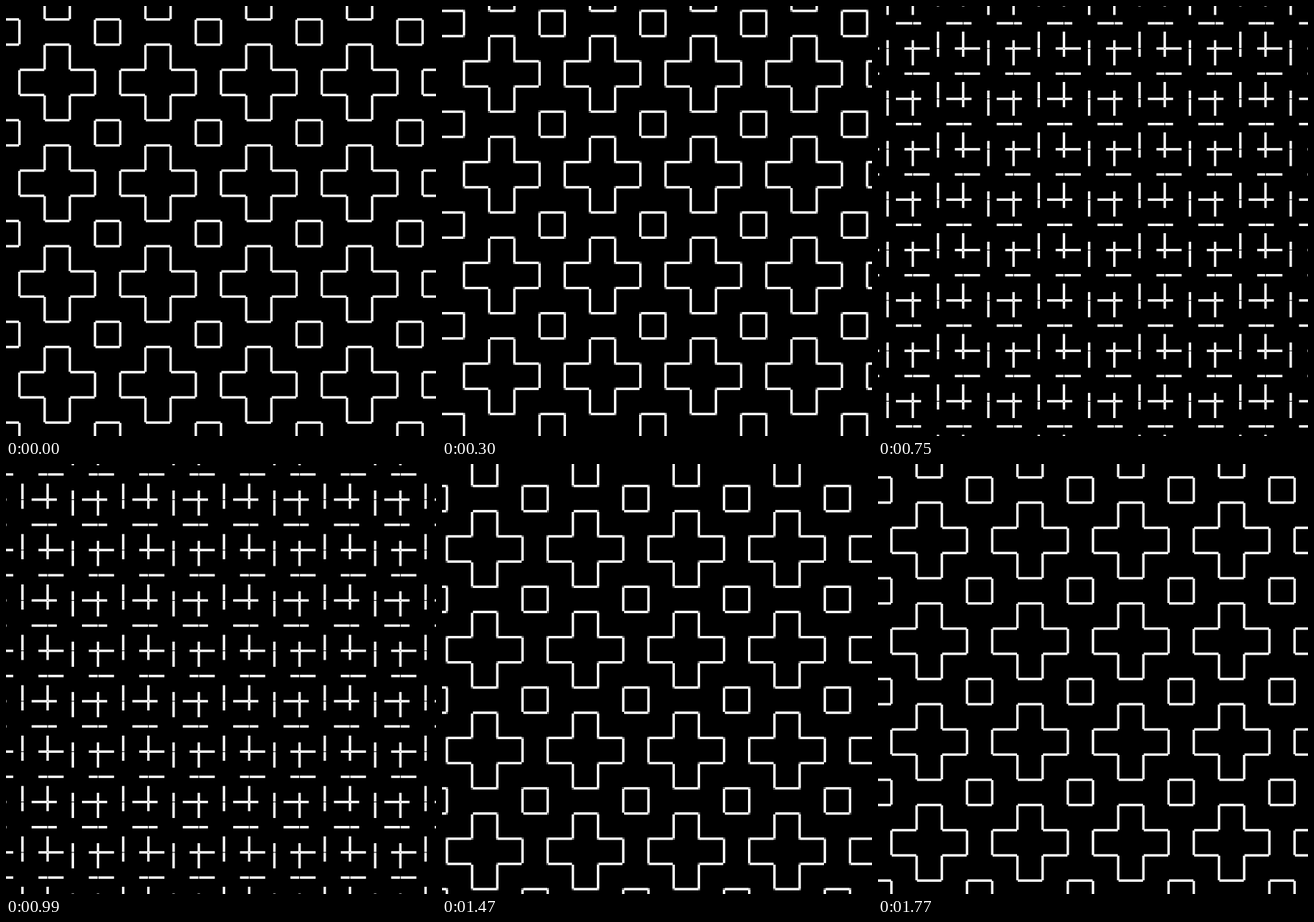
Recreate the animation shown at these times as an HTML page with a canvas. Size 600 by 600 pixels, loop 1.8 s.

```html
<!DOCTYPE html>
<html lang="en">
<head>
<meta charset="utf-8">
<title>Crosses and squares</title>
<style>
  html, body { margin: 0; width: 100%; height: 100%; overflow: hidden; background: #000; }
  canvas { display: block; width: 600px; height: 600px; }
</style>
</head>
<body>
<canvas id="stage" width="600" height="600"></canvas>
<script>
const ctx = document.getElementById('stage').getContext('2d');
const SIZE = 600;
const UNIT = SIZE * 15 / 256;
const WEIGHT = 3.4;
const SEAM = 0.5;
const STEP = 30;
const STEPS = 60;

const ease = p => p < 0.5
  ? 0.5 * Math.pow(2 * p, 2.5)
  : 1 - 0.5 * Math.pow(2 - 2 * p, 2.5);

// Outer lines of each group of four hold odd dashes, inner lines even ones.
const isOuter = i => (((i % 4) + 4) % 4) % 3 === 0;

function bar(across, from, to, vertical) {
  if (to <= from) return;
  const edge = across - WEIGHT / 2;
  if (vertical) ctx.fillRect(edge, from, WEIGHT, to - from);
  else ctx.fillRect(from, edge, to - from, WEIGHT);
}

// A dash is split by a fine seam at the grid point it slides over.
function dash(across, origin, k, slide, vertical) {
  const start = origin + k * UNIT + slide;
  const end = start + UNIT;
  const joint = origin + (slide < 0 ? k : k + 1) * UNIT;
  const first = origin + (slide < 0 ? k - 1 : k) * UNIT;
  bar(across, Math.max(start, first + SEAM), joint - SEAM, vertical);
  bar(across, joint + SEAM, Math.min(end, joint + UNIT - SEAM), vertical);
}

function draw(p) {
  const drift = 2 * UNIT * p;
  const slide = UNIT * ease(p);
  const x0 = SIZE / 2 - 8 * UNIT + drift;
  const y0 = SIZE / 2 - 7 * UNIT - drift;

  ctx.fillStyle = '#000';
  ctx.fillRect(0, 0, SIZE, SIZE);
  ctx.fillStyle = '#fff';
  for (let i = -5; i < 21; i++) {
    const outer = isOuter(i);
    const way = outer ? slide : -slide;
    for (let k = outer ? -5 : -6; k < 22; k += 2) {
      dash(y0 + i * UNIT, x0, k, way, false);
      dash(x0 + i * UNIT, y0, k, -way, true);
    }
  }
}

const begin = performance.now();
function tick() {
  const t = Math.max(0, performance.now() - begin);
  draw((Math.floor(t / STEP) % STEPS) / (STEPS - 1));
  requestAnimationFrame(tick);
}
tick();
</script>
</body>
</html>
```
